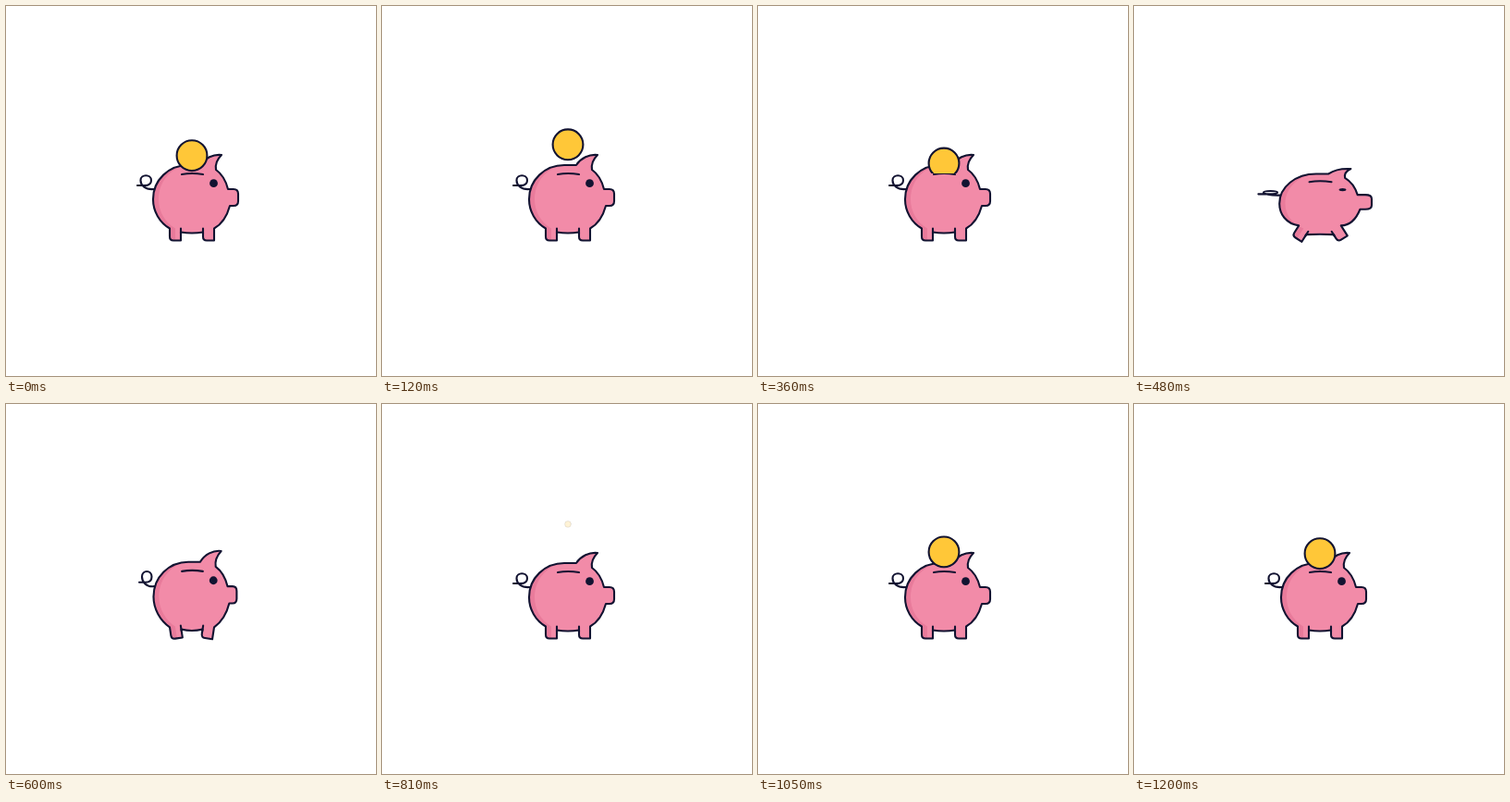
Write an HTML page with a canvas that moves like this. It is 400 px wide and 400 px high and loops after 2.26 s.

```html
<!DOCTYPE html>
<html lang="en">
<head>
<meta charset="utf-8">
<title>Piggy bank</title>
<style>
  html, body { margin: 0; width: 100%; height: 100%; overflow: hidden; background: #fff; }
  canvas { display: block; width: 400px; height: 400px; }
</style>
</head>
<body>
<canvas id="stage"></canvas>
<script>
const LOOP = 2260;
const INK = '#121331', PINK = '#f28ba8', SHADE = '#e97b9b', GOLD = '#ffc738';

const BODY = 'M177 240.5 C166 234 159 222 159 209 C159 188 176 172 197 172 L210 172 ' +
  'C215 164.5 224 160 233 161 C229 165 226 171 227 177 C234 182 238 190 240 198 ' +
  'L246 198 Q251 198 251 203 L251 211 Q251 216 246 216 L242 216 ' +
  'C239 227 233 236 225 240.5 L225 253.5 L217 253.5 Q213 253.5 213 249.5 L213 244.5 ' +
  'Q201 246.5 189 244.5 L189 253.5 L181 253.5 Q177 253.5 177 249.5 Z';
const SIDE = 'M177 240.5 C166 234 159 222 159 209 C159 188 176 172 197 172 ' +
  'C181 173 165 188 165 209 C165 222 172 234 183 240.5 L183 253.5 L177 253.5 Z';
const LEGS = 'M189 246 L189 240.5 M213 246 L213 240.5';
const SLOT = 'M190 182 Q201 180 213 182';
const TAIL = 'M160 198 C150 199 145.5 193 145.5 188.5 C145.5 181.5 157 181.5 157 188.5 ' +
  'C157 192.5 154 194 150 194 L142 194';

const canvas = document.getElementById('stage');
const ctx = canvas.getContext('2d');
const dpr = window.devicePixelRatio || 1;
canvas.width = canvas.height = 400 * dpr;

const span = (t, a, b) => Math.min(1, Math.max(0, (t - a) / (b - a)));
const mix = (a, b, p) => a + (b - a) * p;
const inOut = p => (1 - Math.cos(Math.PI * p)) / 2;
const sineOut = p => Math.sin(Math.PI * p / 2);

// Squash amount: 1 is the hardest hit, below 0 is the rebound.
function squash(t) {
  if (t < 450) return inOut(span(t, 370, 450));
  if (t < 600) return mix(1, -0.17, sineOut(span(t, 450, 600)));
  return mix(-0.17, 0, inOut(span(t, 600, 765)));
}

// Bends a resting body point: flatten, stretch the snout, splay the legs.
function bend(x, y, kx, ky) {
  if (y > 239 && x !== 201) {
    const left = x < 201, cx = left ? 183 : 219;
    const a = (left ? 0.6 : -0.6) * kx, c = Math.cos(a), s = Math.sin(a);
    const u = x - cx, v = y - 241;
    return [cx + u * c - v * s, 241 + u * s + v * c];
  }
  const dx = (x - 201) * 0.045 + Math.max(0, x - 240) * 0.37;
  const dy = (245 - y) * 0.138 + Math.max(0, 172 - y) * 0.4;
  return [x + kx * dx, y + ky * dy];
}

function bendTail(x, y, kx, ky) {
  return [x - kx * (1.8 + 0.0193 * (160 - x) ** 2), y + ky * (7 - 0.73 * (y - 198))];
}

function shape(d, warp, kx, ky) {
  return new Path2D(d.replace(/([\d.]+) ([\d.]+)/g,
    (_, x, y) => warp(+x, +y, kx, ky).map(n => n.toFixed(3)).join(' ')));
}

function drawPig(kx, ky) {
  const body = shape(BODY, bend, kx, ky);
  ctx.stroke(shape(TAIL, bendTail, kx, ky));
  ctx.fillStyle = PINK;
  ctx.fill(body);
  ctx.save();
  ctx.clip(body);
  ctx.fillStyle = SHADE;
  ctx.fill(shape(SIDE, bend, kx, ky));
  ctx.restore();
  ctx.stroke(body);
  ctx.stroke(shape(LEGS, bend, kx, ky));
  ctx.stroke(shape(SLOT, bend, kx, ky));

  const [x, y] = bend(224.5, 191.7, kx, ky);
  const open = Math.min(1, Math.max(0.15, 1 - 0.68 * ky));
  ctx.fillStyle = INK;
  ctx.beginPath();
  ctx.ellipse(x, y, 4.4 - 0.5 * Math.max(0, kx), 4.4 * open, 0, 0, 7);
  ctx.fill();
}

function coinAt(t) {
  if (t < 180) return { y: mix(161.7, 146, inOut(t / 180)), size: 1 };
  if (t < 450) return { y: mix(146, 205, span(t, 180, 450) ** 2.25), size: 1 };
  return {
    y: 161.7 - 40 * (1 - span(t, 780, 1200)) ** 3,
    size: span(t, 780, 930)
  };
}

function drawCoin(t, ky) {
  const { y, size } = coinAt(t);
  if (!size) return;
  ctx.save();
  ctx.beginPath();
  ctx.rect(0, 0, 400, bend(201, 181, 0, ky)[1]);
  ctx.clip();
  ctx.globalAlpha = size;
  ctx.translate(201, y);
  ctx.scale(size, size);
  ctx.fillStyle = GOLD;
  ctx.beginPath();
  ctx.arc(0, 0, 16.4, 0, 7);
  ctx.fill();
  ctx.stroke();
  ctx.restore();
}

function draw(t) {
  const kx = squash(t) * 1.5;
  const ky = kx < 0 ? kx / 2 : kx;
  ctx.setTransform(dpr, 0, 0, dpr, 0, 0);
  ctx.fillStyle = '#fff';
  ctx.fillRect(0, 0, 400, 400);
  ctx.strokeStyle = INK;
  ctx.lineWidth = 2.1;
  ctx.lineCap = ctx.lineJoin = 'round';
  drawPig(kx, ky);
  drawCoin(t, ky);
}

const start = performance.now();
function tick() {
  draw((performance.now() - start) % LOOP);
  requestAnimationFrame(tick);
}
tick();
</script>
</body>
</html>
```
